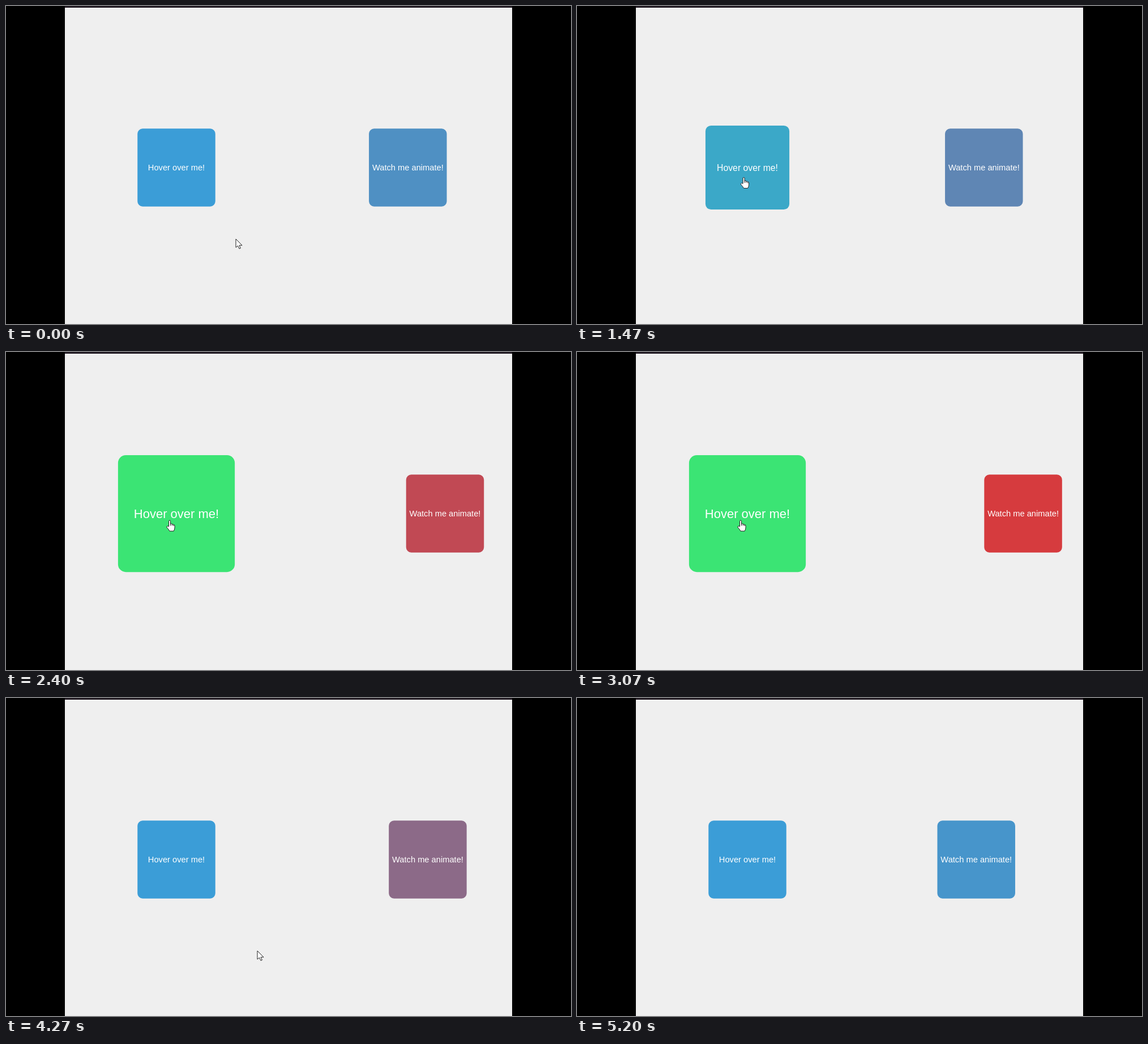
Recreate the animation shown at these times as an HTML page with a canvas. Size 998x561 px, loop 5.27 s.

```html
<!DOCTYPE html>
<html lang="en">
<head>
<meta charset="utf-8">
<title>Hover and keyframe boxes</title>
<style>
  html, body { margin: 0; width: 100%; height: 100%; overflow: hidden; background: #000; }
  canvas { display: block; }
</style>
</head>
<body>
<canvas id="stage" width="998" height="561"></canvas>
<script>
const ctx = document.getElementById('stage').getContext('2d');
const LOOP = 5270, STEP = 200 / 3;
const BLUE = [59, 157, 215], GREEN = [59, 228, 116], RED = [218, 57, 59];
const ZOOM = 137.5 / 150;
const HOVER_IN = 1402, HOVER_OUT = 3190, HOVER_TIME = 480;
const SLIDE_START = 1045, SLIDE_TIME = 2500;
const CURSOR_HIDE = 4560;

// Cursor path: time, x, y
const trail = [
  [1320, 406, 411], [1470, 292, 300], [1700, 289, 297], [3070, 289, 297],
  [3200, 405, 410], [3470, 429, 441], [3730, 443, 445], [3930, 444, 446]
];
const arrow = new Path2D('M0 0V15L3.5 12L6 17.2L8.4 16.2L6 11.2H11Z');
const hand = new Path2D('M-1.5 11V1.6Q-1.5 0 0 0T1.5 1.6V6Q4 5 4.3 7 6.6 6 7 8 9 7.5 9 9.5V13Q9 16 7 19H0Q-1.5 16 -4.5 13 -6 11 -4 10 -3 9.8 -1.5 11Z');
const knuckles = new Path2D('M1.5 6V9.5M4.3 7V9.5M7 8V10');

const clamp = x => Math.min(1, Math.max(0, x));
const mix = (a, b, k) => a + (b - a) * k;
const blend = (a, b, k) => `rgb(${a.map((v, i) => Math.round(mix(v, b[i], k)))})`;
const bezier = (a, b, u) => 3 * a * u * (1 - u) ** 2 + 3 * b * u * u * (1 - u) + u ** 3;

// CSS "ease": cubic-bezier(.25, .1, .25, 1)
function ease(x) {
  x = clamp(x);
  let lo = 0, hi = 1;
  for (let i = 0; i < 24; i++) {
    const mid = (lo + hi) / 2;
    if (bezier(.25, .25, mid) < x) lo = mid; else hi = mid;
  }
  return bezier(.1, 1, (lo + hi) / 2);
}

function box(x, scale, color, label) {
  ctx.save();
  ctx.translate(x, 285);
  ctx.scale(ZOOM * scale, ZOOM * scale);
  ctx.fillStyle = color;
  ctx.beginPath();
  ctx.roundRect(-75, -75, 150, 150, 10);
  ctx.fill();
  ctx.fillStyle = '#fff';
  ctx.font = '16px "Liberation Sans", Arial, sans-serif';
  ctx.textAlign = 'center';
  ctx.fillText(label, 0, 5.6);
  ctx.restore();
}

function cursorAt(t) {
  const next = trail.findIndex(p => p[0] > t);
  if (next < 0) return trail.at(-1).slice(1);
  const b = trail[next], a = trail[Math.max(0, next - 1)];
  const k = a === b ? 0 : (t - a[0]) / (b[0] - a[0]);
  return [mix(a[1], b[1], k), mix(a[2], b[2], k)];
}

function cursor(t) {
  if (t > CURSOR_HIDE) return;
  const hovering = t > HOVER_IN && t < HOVER_OUT;
  const shape = hovering ? hand : arrow;
  ctx.save();
  ctx.translate(...cursorAt(t));
  ctx.fillStyle = '#fff';
  ctx.strokeStyle = '#222';
  ctx.lineWidth = 1;
  ctx.fill(shape);
  ctx.stroke(shape);
  if (hovering) ctx.stroke(knuckles);
  ctx.restore();
}

function draw(t) {
  ctx.fillStyle = '#000';
  ctx.fillRect(0, 0, 998, 561);
  ctx.fillStyle = '#efefef';
  ctx.fillRect(104, 0, 790, 561);
  ctx.fillStyle = '#231c24';
  ctx.fillRect(104, 0, 790, 3);

  const hover = ease((t - HOVER_IN) / HOVER_TIME) - ease((t - HOVER_OUT) / HOVER_TIME);
  box(301, 1 + hover / 2, blend(BLUE, GREEN, hover), 'Hover over me!');

  const phase = (t - SLIDE_START + 2 * SLIDE_TIME) / SLIDE_TIME % 2;
  const slide = phase < 1 ? ease(phase) : 1 - ease(phase - 1);
  box(mix(698.1, 790.1, slide), 1, blend(BLUE, RED, slide), 'Watch me animate!');

  cursor(t);
}

const start = performance.now();
function tick() {
  const t = (performance.now() - start) % LOOP;
  draw(Math.floor(t / STEP + .06) * STEP);
  requestAnimationFrame(tick);
}
tick();
</script>
</body>
</html>
```
